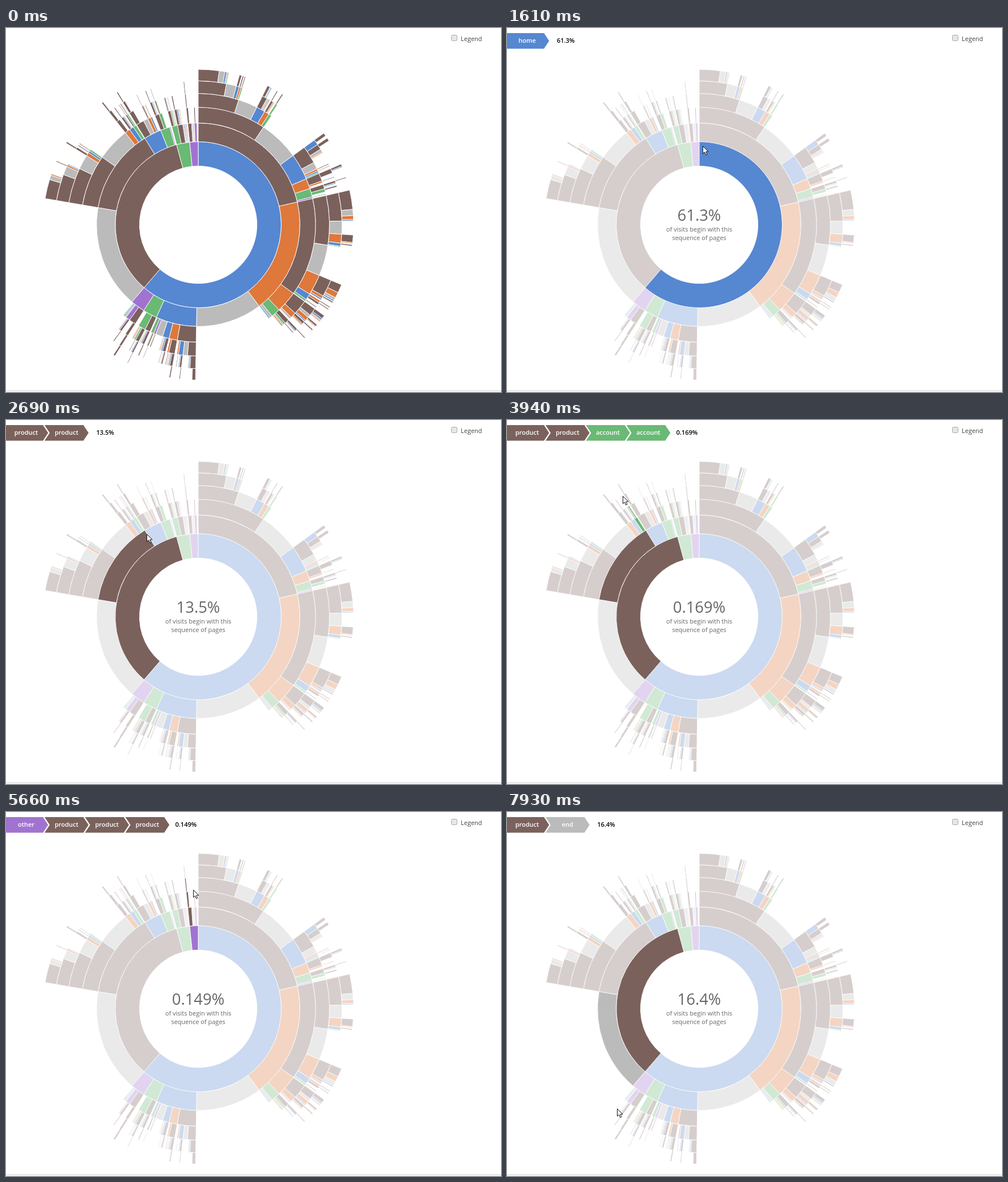
Recreate the animation shown at these times as an HTML page. Size 873 by 642 pixels, loop 8000 ms.

```html
<!DOCTYPE html>
<html lang="en">
<head>
<meta charset="utf-8">
<title>Visit sequences</title>
<style>
  html, body { margin: 0; width: 100%; height: 100%; overflow: hidden; background: #fff; }
  svg { display: block; width: 873px; height: 642px; font: 11px "Open Sans", sans-serif; }
  #chart path { stroke: #fff; stroke-width: .92; }
  #trail text { font-weight: 600; text-anchor: middle; fill: #fff; }
  #trail .share { fill: #000; }
  #summary { fill: #666; text-anchor: middle; }
  #summary .share { font-size: 27.4px; }
</style>
</head>
<body>
<svg viewBox="0 0 873 642" xmlns="http://www.w3.org/2000/svg">
  <rect y="639" width="873" height="1.5" fill="#ddd"/>
  <rect x="785.5" y="12.5" width="10" height="10" rx="2" fill="#e6e6e6" stroke="#a9a9a9"/>
  <text x="802" y="23" fill="#444">Legend</text>
  <g id="chart"></g>
  <g id="summary">
    <text class="share" x="339" y="340"></text>
    <text x="339" y="359">of visits begin with this</text>
    <text x="339" y="374">sequence of pages</text>
  </g>
  <g id="trail"></g>
  <path id="cursor" d="M.5 .5V13.6L3.6 10.8 5.7 15.8 7.9 14.8 5.8 10H10z" fill="#fff" stroke="#111" stroke-width="1"/>
</svg>
<script>
const PAGES = {
  h: ['home', '#5687d1'], p: ['product', '#7b615c'], s: ['search', '#de783b'],
  a: ['account', '#6ab975'], o: ['other', '#a173d1'], e: ['end', '#bbbbbb']
};

// Page letter, width in degrees, children in brackets.
const TREE = `
h220.68(
  p77.1(
    p33.8(p18(p11.4(p7.8 e2.1 h.7 s.4 a.4) e4 h1.2(p.9) s.8(p.5) a.6(p.4))
      e8.5 h3.9(p2.1(p1.1 e.35 h.35) e.5 h.4 s.4) s2.2 a1.3(a.8(p.5)))
    e20.1
    h13.1(p7.8(h2.2(p1.2) p2.2(p1.2) e1.2 s.4) e3.1 s.9 h.7 a.6)
    s5.1(p3.5(p1.9) s.8) a4.2(p2 a1.4) o.8)
  s66.1(
    p48.7(p21.9(p11.4(p7.2 e2.3 s1.4 h.5) e5.3 s3.6(p2.8 s.4) h1.2 a.4)
      e13.7 s9.2(p7(p3.2 s2.1 e1 h.5) s1.2 h.6) h2.8(s.9 p.9) a.9)
    s10.7(p6.6(p3.1 e1.2 s1.6 h.5) s2.5 e.9) a4.5 e1.4 h.6)
  e37.8
  h23.3(p9.3(p3.7(p2.3(p1.3) h.5 e.4) e2 h2 s.7) s4.1(p2.7 s.8) h3.3 e3.5 o1.1 a1.5)
  a8.1(p2.6 a3.7)
  o8.3(p3.4(p1.3(p.9(p.7))) o2.2 e.6 h.5 a.5))
p124.2(
  e59.04
  p48.6(p25.4(p15.6(p10.7(p7.2 e1.7 s.5) e3.5 s.7(p.4) h.4)
      e6.4 s1.6(p.9(p.6)) h.9 a.8)
    e16.5 s2.6(p1.6(p1.1(p.6))) h2.2 a1.6(p.7 a.608(p.39)))
  h10(p3.9(p2(p1(p.5))) e2.3 s1.5 h.8)
  a5.4(p2.2 a1.5) o.6)
a9.2(a3.3 p3.1 e.7 h.6 s.5 o.5)
o5.92(p2.2(p1(p.536(p.4))) e.6 h.5 s.5 o1.4)`;

// Time in ms, pointer x and y, hovered sequence.
const STEPS = [
  [210, 787, 2, ''], [600, 690, 400, ''], [800, 600, 597, ''], [1000, 535, 500, ''],
  [1070, 522, 480, 'hsp'], [1150, 480, 400, 'hs'], [1230, 450, 370, 'h'],
  [1610, 345, 208, 'h'], [1760, 335, 212, 'o'], [1920, 315, 215, 'a'],
  [2000, 300, 215, 'p'], [2300, 258, 218, 'p'], [2470, 255, 212, 'pp'],
  [2690, 248, 201, 'pp'], [3000, 234, 183, 'ppa'], [3230, 226, 165, 'ppaa'],
  [3500, 214, 145, 'ppaap'], [3700, 204, 137, 'ppaa'], [3940, 204, 134, 'ppaa'],
  [4180, 201, 130, 'ppaa'], [4340, 210, 127, 'phppp'], [4500, 222, 118, 'phpppp'],
  [4650, 228, 115, 'phpppp'], [5110, 230, 116, 'phpp'], [5220, 250, 120, 'pap'],
  [5400, 290, 128, 'aap'], [5520, 315, 130, 'oppp'], [5660, 330, 137, 'oppp'],
  [5740, 345, 150, 'hpp'], [5890, 365, 185, 'hp'], [6100, 390, 225, 'h'],
  [6760, 420, 413, 'h'], [6840, 410, 420, 'h'], [7200, 270, 440, 'h'],
  [7300, 250, 435, 'p'], [7600, 222, 430, 'p'], [7690, 212, 450, 'pe'],
  [7930, 194, 523, 'pe'], [8000, 194, 523, 'pe']
];

const LOOP = 8000, CX = 339, CY = 347, RADIUS = 274, LEVELS = 7, MIN_WIDTH = .286;
const $ = s => document.querySelector(s);
const chart = $('#chart'), trail = $('#trail'), summary = $('#summary'), cursor = $('#cursor');
const nodes = new Map();

function add(parent, tag, attrs, text = '') {
  const el = document.createElementNS('http://www.w3.org/2000/svg', tag);
  for (const name in attrs) el.setAttribute(name, attrs[name]);
  el.textContent = text;
  return parent.appendChild(el);
}

const tokens = TREE.match(/[a-z][\d.]+|[()]/g);
function parse() {
  const list = [];
  while (tokens.length && tokens[0] !== ')') {
    const token = tokens.shift();
    const node = { page: token[0], width: +token.slice(1) };
    if (tokens[0] === '(') {
      tokens.shift();
      node.kids = parse();
      tokens.shift();
    }
    list.push(node);
  }
  return list;
}

// Usual mix of next pages where the tree gives none.
function nextPages({ page, width }) {
  if (page === 'e') return [];
  const mix = [['p', .44], [page === 'p' ? 'h' : page, .2], ['e', .14]];
  if (page !== 's') mix.push(['s', .12]);
  return mix.map(([next, share]) => ({ page: next, width: width * share }));
}

function point(r, deg) {
  const a = deg * Math.PI / 180;
  return (CX + r * Math.sin(a)).toFixed(2) + ' ' + (CY - r * Math.cos(a)).toFixed(2);
}

function sector(depth, from, to) {
  const inner = RADIUS * Math.sqrt(depth / LEVELS);
  const outer = RADIUS * Math.sqrt((depth + 1) / LEVELS);
  const large = to - from > 180 ? 1 : 0;
  return `M${point(outer, from)}A${outer} ${outer} 0 ${large} 1 ${point(outer, to)}` +
    `L${point(inner, to)}A${inner} ${inner} 0 ${large} 0 ${point(inner, from)}Z`;
}

function layout(list, start, prefix) {
  for (const node of list) {
    const key = prefix + node.page;
    if (node.width >= MIN_WIDTH) {
      node.el = add(chart, 'path', {
        d: sector(key.length, start, start + node.width), fill: PAGES[node.page][1]
      });
      nodes.set(key, node);
      if (key.length < LEVELS - 1) layout(node.kids || nextPages(node), start, key);
    }
    start += node.width;
  }
}
layout(parse(), 0, '');

const UNIT = .9136, LEFT = -3.3, TOP = 9;
function drawTrail(seq, share) {
  trail.textContent = '';
  const w = 75 * UNIT, h = 30 * UNIT, tip = 10 * UNIT, pitch = 78 * UNIT;
  const textY = 26;
  [...seq].forEach((page, i) => {
    const [name, fill] = PAGES[page], x = LEFT + i * pitch;
    const corners = [[x, TOP], [x + w, TOP], [x + w + tip, TOP + h / 2], [x + w, TOP + h], [x, TOP + h]];
    if (i) corners.push([x + tip, TOP + h / 2]);
    add(trail, 'polygon', { points: corners.join(' '), fill });
    add(trail, 'text', { x: x + (w + tip) / 2, y: textY }, name);
  });
  add(trail, 'text', { class: 'share', x: LEFT + (seq.length + .5) * pitch, y: textY }, share);
}

let shown = null;
function hover(seq) {
  if (seq === shown) return;
  shown = seq;
  for (const [key, node] of nodes) node.el.setAttribute('opacity', seq.startsWith(key) || !seq ? 1 : .3);
  summary.style.display = trail.style.display = seq ? '' : 'none';
  if (!seq) return;
  const share = (nodes.get(seq).width / 3.6).toPrecision(3) + '%';
  summary.querySelector('.share').textContent = share;
  drawTrail(seq, share);
}

function render(t) {
  const next = STEPS.findIndex(step => step[0] > t);
  cursor.style.display = next > 0 ? '' : 'none';
  if (next < 1) return hover('');
  const [t0, x0, y0, seq] = STEPS[next - 1], [t1, x1, y1] = STEPS[next];
  const k = (t - t0) / (t1 - t0);
  const x = Math.round(x0 + (x1 - x0) * k), y = Math.round(y0 + (y1 - y0) * k);
  cursor.setAttribute('transform', `translate(${x} ${y})`);
  hover(seq);
}

const begin = performance.now();
function tick() {
  render((performance.now() - begin) % LOOP);
  requestAnimationFrame(tick);
}
tick();
</script>
</body>
</html>
```
